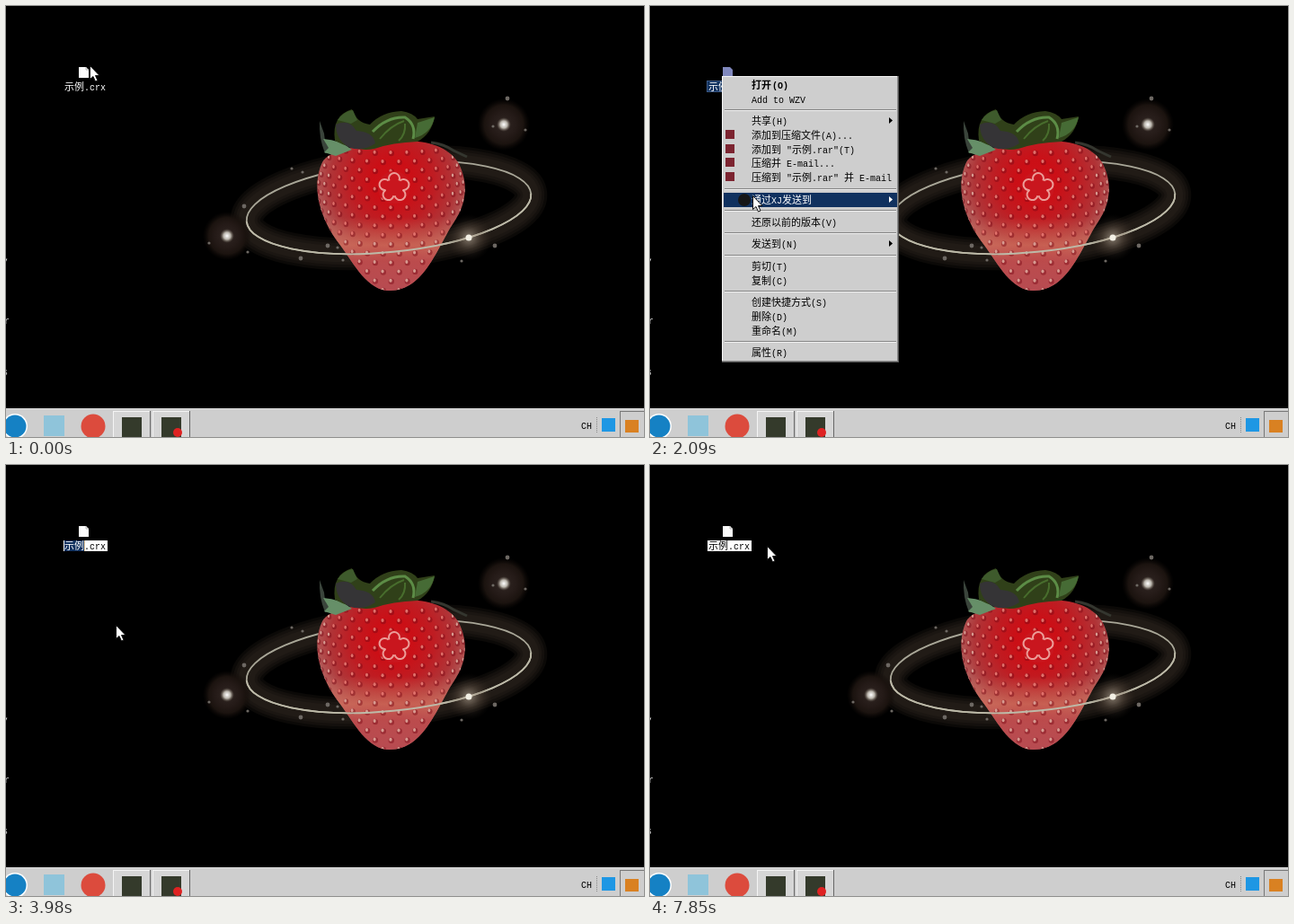
Write an HTML page with a canvas that moves like this. It is 710 px wide and 480 px high and loops after 8000 ms.

```html
<!DOCTYPE html>
<html lang="zh">
<head>
<meta charset="utf-8">
<style>
  html, body { margin: 0; width: 100%; height: 100%; overflow: hidden; background: #000; }
  canvas { display: block; }
</style>
</head>
<body>
<canvas id="stage" width="710" height="480"></canvas>
<script>
const LOOP = 8000, TAU = Math.PI * 2;
const GREY = '#cecece', NAVY = '#10315f';
const stage = document.getElementById('stage').getContext('2d');
let ctx = stage;

function box(x, y, w, h, color) {
  ctx.fillStyle = color;
  ctx.fillRect(x, y, w, h);
}

function oval(x, y, rx, ry, color) {
  ctx.fillStyle = color;
  ctx.beginPath();
  ctx.ellipse(x, y, rx, ry, 0, 0, TAU);
  ctx.fill();
}

function disc(x, y, r, color) {
  oval(x, y, r, r, color);
}

function shape(d, fill) {
  ctx.fillStyle = fill;
  ctx.fill(new Path2D(d));
}

function line(d, color, width) {
  ctx.strokeStyle = color;
  ctx.lineWidth = width;
  ctx.stroke(new Path2D(d));
}

function radial(x, y, r, ...colors) {
  const g = ctx.createRadialGradient(x, y, 0, x, y, r);
  colors.forEach((c, i) => g.addColorStop(i / (colors.length - 1), c));
  return g;
}

// Chinese runs use 11px cells, Latin runs 6px cells.
function text(str, x, y, color, bold = false) {
  ctx.fillStyle = color;
  for (const run of str.match(/[\x20-\x7e]+|[^\x20-\x7e]+/g)) {
    const latin = run.charCodeAt(0) < 128;
    ctx.font = (bold ? 'bold ' : '') + (latin
      ? '10px "Liberation Mono", monospace'
      : '11px "Noto Sans CJK SC", "Noto Sans CJK", sans-serif');
    ctx.fillText(run, x, y + 4);
    x += ctx.measureText(run).width + (bold ? 1 : 0);
  }
}

/* ---------- wallpaper ---------- */

function ring(from, to, color, width) {
  ctx.strokeStyle = color;
  ctx.lineWidth = width;
  ctx.beginPath();
  ctx.ellipse(426, 224.5, 159, 49.5, -0.098, from, to);
  ctx.stroke();
}

function star(x, y, glow, core) {
  disc(x, y, glow, radial(x, y, glow, '#54463f', '#2a201d', '#241a17', '#1b130f', 'rgba(16,10,7,0)'));
  disc(x, y, core * 2, radial(x, y, core * 2, '#fff', '#b8b3aa', 'rgba(90,80,70,0)'));
}

function berry() {
  const body = new Path2D('M352 174C358 161 396 154 430 151C462 148 490 154 503 174C514 194 514 218 499 240C480 268 466 317 427 317C402 317 388 288 371 265C350 238 339 202 352 174Z');
  ctx.save();
  ctx.clip(body);
  box(340, 145, 180, 180, radial(430, 195, 92, '#cf1118', '#cb0f16', '#bf1c22', '#b03437', '#b36a66'));
  const blush = ctx.createLinearGradient(0, 235, 0, 317);
  blush.addColorStop(0, 'rgba(205,100,85,0)');
  blush.addColorStop(.38, 'rgba(205,105,88,.8)');
  blush.addColorStop(.6, 'rgba(190,65,68,.75)');
  blush.addColorStop(1, 'rgba(185,62,72,.7)');
  box(340, 235, 180, 85, blush);
  for (let row = 0; row < 16; row++) {
    for (let col = -7; col <= 7; col++) {
      const u = (col + (row % 2) / 2) / 7;
      const x = 428 + 84 * Math.sin(u * 1.5);
      const y = 158 + row * 10.2 + 5 * Math.cos(u * 2.5);
      const rx = 2.4 - Math.abs(u);
      oval(x + .8, y + 1, rx + .8, 3.2, 'rgba(120,8,20,.45)');
      oval(x, y, rx * .7, 2, Math.abs(u) > .6 || row > 9 ? '#d79a90' : '#e0706a');
    }
  }
  disc(432, 202, 18, '#c9161e');
  for (let i = 0; i < 5; i++) {
    const a = i / 5 * TAU - Math.PI / 2;
    ctx.beginPath();
    ctx.ellipse(432 + 11 * Math.cos(a), 202 + 10 * Math.sin(a), 6, 6, a, -2, 2);
    ctx.lineWidth = 2;
    ctx.strokeStyle = '#ec9d98';
    ctx.stroke();
  }
  ctx.restore();
}

function leaves() {
  shape('M349 128L354 142Q354 155 366 164L355 164Q348 147 349 128Z', '#3a443b');
  shape('M353 148Q372 149 385 160L367 167L354 163L359 158Z', '#668f68');
  shape('M366 150Q362 122 385 115Q390 130 405 132Q418 118 440 117Q453 119 458 126L477 123Q474 142 458 151Q430 152 410 159Q390 163 366 150Z', '#304019');
  shape('M367 132Q382 125 390 139Q409 140 411 153Q398 162 383 158Q367 150 367 132Z', '#353436');
  shape('M369 127Q376 117 386 116L391 127L384 131Z', '#3e5a2c');
  shape('M458 130L477 124Q473 142 455 147Z', '#466b35');
  line('M408 140Q424 123 444 124Q457 132 453 148', '#5c8c46', 3);
  line('M416 148Q428 133 443 128M437 150Q445 143 444 131', '#486d2d', 2);
  line('M473 152Q488 154 498 161L513 168', '#34362f', 3);
}

function wallpaper() {
  box(0, 0, 710, 480, '#000');
  for (let w = 36; w > 12; w -= 6) ring(0, TAU, 'rgba(60,48,41,.19)', w);
  star(554, 132, 29, 4);
  star(246, 256, 27, 4);
  ring(0, TAU, '#a9a798', 1.8);
  const dust = [558,103, 330,185, 318,181, 265,223, 226,264, 269,274, 328,281, 375,283, 507,284, 544,267, 578,138, 542,134, 358,267, 369,269];
  for (let i = 0; i < dust.length; i += 2) disc(dust[i], dust[i + 1], i % 3 ? 1.6 : 2.4, '#6d6863');
  berry();
  leaves();
  ring(0, Math.PI, '#bdbaa8', 1.8);
  disc(515, 258, 26, radial(515, 258, 26, 'rgba(225,210,190,.55)', 'rgba(120,102,86,.3)', 'rgba(60,45,35,0)'));
  disc(515, 258, 3.5, '#f3f0e5');
  text(',', -2, 279, '#ddd');
  text('r', -2, 350, '#ddd');
  text('s', -4, 407, '#ddd');
}

/* ---------- taskbar ---------- */

function bevel(x, y, w, h, fill, topLeft, bottomRight) {
  box(x, y, w, h, bottomRight);
  box(x, y, w - 1, h - 1, topLeft);
  box(x + 1, y + 1, w - 2, h - 2, fill);
}

function taskbar() {
  box(0, 448, 710, 32, GREY);
  box(0, 448, 710, 1, '#dcdcdc');
  disc(10, 468, 14, '#fff');
  disc(10, 468, 12.5, '#1581c4');
  box(42, 456, 23, 23, '#8fc4da');
  disc(97, 468, 13.5, '#dc4b3d');
  for (const x of [119, 163]) {
    bevel(x, 451, 42, 32, '#d6d6d6', '#f4f4f4', '#666');
    box(x + 10, 458, 22, 22, '#343a2b');
  }
  disc(191, 475, 5, '#df2222');
  text('CH', 640, 467, '#000');
  for (let y = 458; y < 476; y += 2) box(657, y, 1, 1, '#888');
  box(663, 459, 15, 15, '#1e97e4');
  bevel(683, 451, 40, 32, GREY, '#777', '#f4f4f4');
  box(689, 461, 15, 14, '#d98122');
}

/* ---------- context menu ---------- */

const MENU = [
  [88, '打开(O)'], [104, 'Add to WZV'],
  [128, '共享(H)', 'arrow'],
  [144, '添加到压缩文件(A)...', 'pack'], [160, '添加到 "示例.rar"(T)', 'pack'],
  [175, '压缩并 E-mail...', 'pack'], [191, '压缩到 "示例.rar" 并 E-mail', 'pack'],
  [216, '通过XJ发送到', 'arrow chat'],
  [241, '还原以前的版本(V)'],
  [265, '发送到(N)', 'arrow'],
  [290, '剪切(T)'], [306, '复制(C)'],
  [330, '创建快捷方式(S)'], [346, '删除(D)'], [362, '重命名(M)'],
  [386, '属性(R)'],
];
const RULES = [115, 203, 227, 252, 277, 317, 373];

function menu(pointerY) {
  box(80, 78, 197, 319, '#555');
  box(80, 78, 196, 318, '#8a8a8a');
  box(80, 78, 195, 317, '#f4f4f4');
  box(81, 79, 194, 316, GREY);
  for (const y of RULES) {
    box(83, y, 191, 1, '#858585');
    box(83, y + 1, 191, 1, '#f0f0f0');
  }
  MENU.forEach(([y, label, marks = ''], i) => {
    const hot = Math.abs(pointerY - y) < 8;
    const ink = hot ? '#fff' : '#000';
    if (hot) box(82, y - 8, 193, 16, NAVY);
    if (marks.includes('pack')) box(84, y - 6, 10, 10, '#7c2430');
    if (marks.includes('chat')) disc(105, y, 7, '#161616');
    if (marks.includes('arrow')) shape(`M266 ${y - 4}l4 3.5l-4 3.5Z`, ink);
    text(label, 113, y, ink, i === 0);
  });
}

/* ---------- desktop file ---------- */

// Spans in which the caret is lit, and where it stands.
const CARET = [
  [3380, 3680, 87], [3980, 4160, 87], [4460, 4760, 87], [5060, 5390, 87],
  [5390, 5790, 93], [5790, 6110, 99], [6110, 6310, 105],
  [6310, 6610, 111], [6940, 7240, 111], [7500, 7850, 111],
];

function file(t) {
  const selected = t >= 640 && t < 2820, editing = t >= 2820;
  shape('M81 68H89L92 71V80H81Z', selected ? '#8088bd' : '#fbfbfb');
  if (!selected) line('M89 68V71H92', '#b8b8b8', 1);
  if (selected) {
    box(63, 83, 49, 13, '#3d5a86');
    box(64, 84, 47, 11, NAVY);
  }
  if (editing) box(64, 84, 49, 12, '#fff');
  text('示例.crx', 65, 90, editing ? '#000' : '#fff');
  if (editing && t < 5390) {
    box(65, 84, 23, 12, NAVY);
    text('示例', 65, 90, '#fff');
  }
  const caret = CARET.find(([on, off]) => t >= on && t < off);
  if (caret) invert(() => box(caret[2], 84, 1, 12, '#fff'));
}

/* ---------- pointer ---------- */

function invert(draw) {
  ctx.globalCompositeOperation = 'difference';
  draw();
  ctx.globalCompositeOperation = 'source-over';
}

// time, x, y
const PATH = [
  [0, 93, 66], [380, 234, 113], [639.9, 234, 113],
  [640, 81, 73], [840, 81, 73], [1000, 68, 89], [1200, 81, 79],
  [1730, 81, 79], [2520, 153, 367], [2790, 153, 367],
  [3550, 122, 181], [3950, 122, 181], [3980, 122, 178], [4160, 97, 92],
  [7470, 97, 92], [7650, 130, 90], [LOOP, 130, 90],
];

function pointerAt(t) {
  const i = PATH.findIndex(key => key[0] > t);
  const [t0, x0, y0] = PATH[i - 1], [t1, x1, y1] = PATH[i];
  const k = (t - t0) / (t1 - t0);
  return [Math.round(x0 + (x1 - x0) * k), Math.round(y0 + (y1 - y0) * k)];
}

function pointer(x, y, overText) {
  if (overText) {
    invert(() => {
      box(x, y - 7, 1, 16, '#fff');
      for (const dy of [-8, 9]) {
        box(x - 3, y + dy, 3, 1, '#fff');
        box(x + 1, y + dy, 3, 1, '#fff');
      }
    });
    return;
  }
  const arrow = `M${x + .5} ${y + .5}v15l3.5 -3l2.5 5.5l2.5 -1l-2.5 -5.5h4.5Z`;
  shape(arrow, '#fff');
  line(arrow, '#111', 1);
}

/* ---------- playback ---------- */

const backdrop = document.createElement('canvas');
backdrop.width = 710;
backdrop.height = 480;
ctx = backdrop.getContext('2d');
wallpaper();
taskbar();
ctx = stage;

function render(now) {
  const t = now % LOOP;
  const [x, y] = pointerAt(t);
  ctx.drawImage(backdrop, 0, 0);
  file(t);
  if (t >= 1730 && t < 2820) menu(y);
  pointer(x, y, t >= 2820 && x < 113 && y < 98);
}

const start = performance.now();
function tick() {
  render(performance.now() - start);
  requestAnimationFrame(tick);
}
tick();
</script>
</body>
</html>
```
